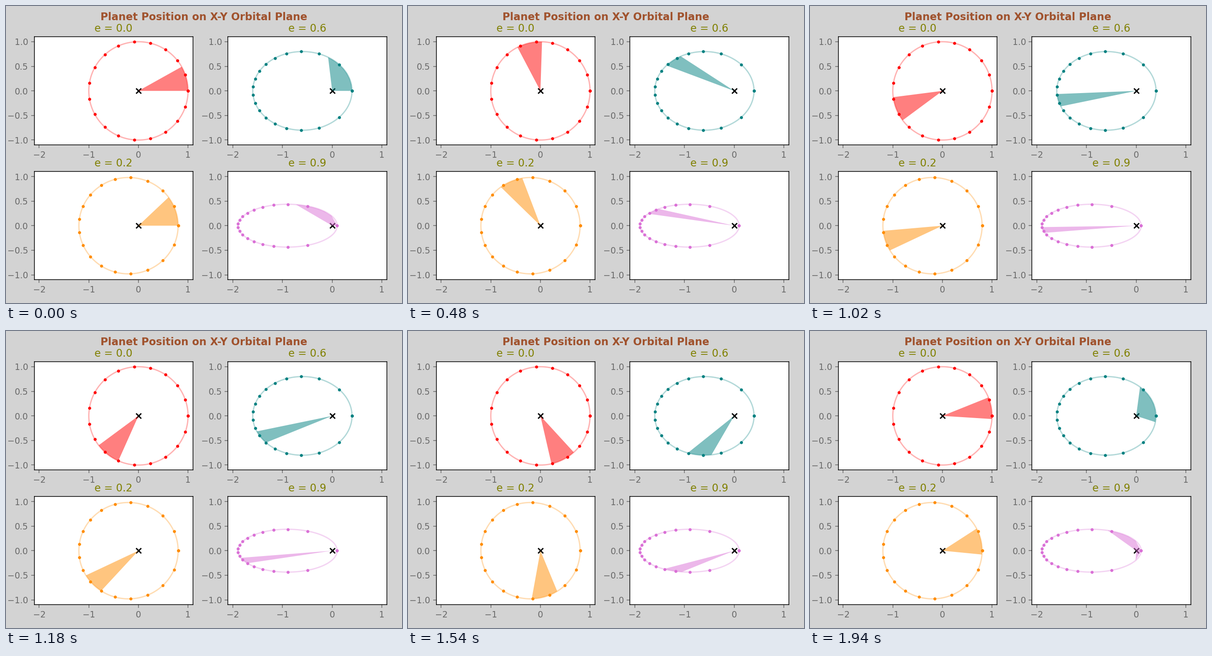
A matplotlib script that plays this animation: 864x648 px, repeating every 1.96 s.

```python
import numpy as np
import matplotlib.pyplot as plt
from matplotlib.animation import FuncAnimation

W, H, DPI = 864, 648, 135
FRAMES, SPAN = 98, 9          # steps per orbit, samples per swept sector
AX_W, AX_H = 346.4, 236.0

# eccentricity, colour, left and top of the panel in pixels
PANELS = [
    (0.0, "red", 61.6, 67.2),
    (0.6, "teal", 484.3, 67.2),
    (0.2, "darkorange", 61.6, 361.3),
    (0.9, "orchid", 484.3, 361.3),
]


def eccentric_anomaly(mean, e):
    """Solve Kepler's equation by Newton iteration."""
    E = mean + e * np.sin(mean)
    for _ in range(30):
        E = E - (E - e * np.sin(E) - mean) / (1 - e * np.cos(E))
    return E


def orbit(E, e):
    """Position relative to the focus for eccentric anomaly E."""
    return np.column_stack([np.cos(E) - e, np.sqrt(1 - e * e) * np.sin(E)])


fig = plt.figure(figsize=(W / DPI, H / DPI), dpi=DPI, facecolor="lightgray")
fig.suptitle("Planet Position on X-Y Orbital Plane",
             color="sienna", weight="bold")

mean = np.linspace(0, 2 * np.pi, FRAMES + 1)
dots_mean = np.linspace(0, 2 * np.pi, 20)
full_turn = np.linspace(0, 2 * np.pi, 300)


def make_panel(e, color, left, top):
    ax = fig.add_axes([left / W, 1 - (top + AX_H) / H, AX_W / W, AX_H / H])
    ax.set(xlim=(-2.1, 1.1), ylim=(-1.1, 1.1),
           xticks=range(-2, 2), yticks=np.arange(-1, 1.5, 0.5))
    ax.set_title(f"e = {e}", color="olive")
    ax.tick_params(colors="dimgray")

    ax.scatter(0, 0, c="black", marker="x")
    ax.plot(*orbit(full_turn, e).T, color=color, alpha=0.3)
    dots = orbit(eccentric_anomaly(dots_mean, e), e)
    ax.plot(*dots.T, ".", color=color, ms=5)

    path = orbit(eccentric_anomaly(mean, e), e)
    sector, = ax.fill([0, 0, 0], [0, 0, 0], facecolor=color, alpha=0.5, lw=0)
    return sector, path


sectors = [make_panel(*panel) for panel in PANELS]


def update(i):
    idx = (i + np.arange(SPAN)) % len(mean)
    for sector, path in sectors:
        sector.set_xy(np.vstack([[0, 0], path[idx]]))
    return [sector for sector, _ in sectors]


anim = FuncAnimation(fig, update, frames=FRAMES, interval=20,
                     repeat=True, repeat_delay=0, blit=False)
plt.show()
```
